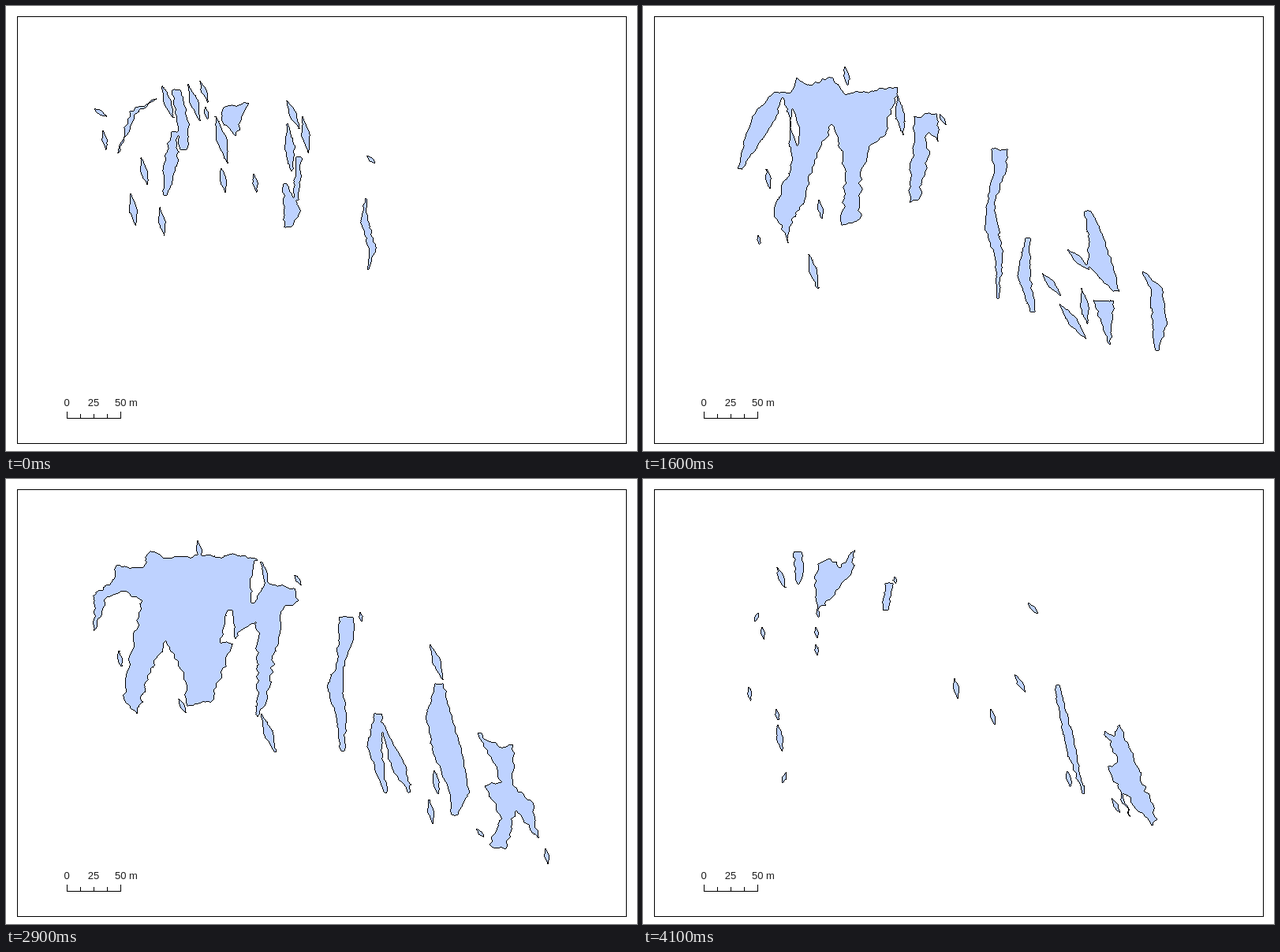
Recreate the animation shown at these times as an HTML page with a canvas. Size 800 by 565 pixels, loop 4.2 s.

```html
<!DOCTYPE html>
<html lang="en">
<head>
<meta charset="utf-8">
<title>Drifting water patches</title>
<style>
  html, body { margin: 0; width: 100%; height: 100%; overflow: hidden; background: #fff; }
  canvas, svg { position: absolute; left: 0; top: 0; display: block; }
  .map { fill: none; stroke: #000; shape-rendering: crispEdges; }
  text { font: 13px "Liberation Sans", Arial, sans-serif; fill: #1c1c1c; }
</style>
</head>
<body>
<canvas width="800" height="565"></canvas>
<svg width="800" height="565">
  <g class="map">
    <rect x="14.5" y="13.5" width="772" height="542"/>
    <path d="M77.5 515V523.5H145.5V515M94.5 518v5m17-5v5m17-5v5"/>
  </g>
  <text x="77" y="508" text-anchor="middle">0</text>
  <text x="111" y="508" text-anchor="middle">25</text>
  <text x="138" y="508">50 m</text>
</svg>
<script>
const W = 800, H = 565, N = W * H;
const STEP = 100, STEPS = 42;
const DRIFT = 1.45; // leftward pixels per step
const REACH = 6;
const FILL = 0xffffd2be, INK = 0xff000000;
const ctx = document.querySelector('canvas').getContext('2d', { willReadFrequently: true });
const poses = [];

let seed = 7;
const rnd = () => (seed = seed * 16807 % 2147483647) / 2147483647;
const pairs = (list, n) => list.flatMap((_, i) => i % n ? [] : [list.slice(i, i + n)]);

// Closed outline whose edges get small random teeth
function outline(pts, amp) {
  ctx.beginPath();
  pts.forEach(([x, y], i) => {
    const [p, q] = pts[(i + 1) % pts.length];
    const len = Math.hypot(p - x, q - y), n = Math.max(1, Math.round(len / 5));
    ctx.lineTo(x, y);
    for (let k = 1; k < n; k++) {
      const off = (rnd() - 0.5) * 2 * amp;
      ctx.lineTo(x + (p - x) * k / n - (q - y) / len * off,
        y + (q - y) * k / n + (p - x) / len * off);
    }
  });
  ctx.closePath();
  ctx.fill();
  if (ctx.globalCompositeOperation === 'source-over') ctx.stroke();
}

// Polygon from x, y pairs
const body = (...list) => outline(pairs(list, 2), 2.6);

// Upright band from x, y, width triples
function band(...list) {
  const nodes = pairs(list, 3);
  const side = s => nodes.map(([x, y, w]) => [x + s * w / 2, y]);
  outline([...side(1), ...side(-1).reverse()], 1.5);
}

// Thin lens between two points
function sliver(x, y, p, q) {
  const len = Math.hypot(p - x, q - y), w = (1 + 0.09 * len) / len;
  const mx = (x + p) / 2, my = (y + q) / 2, dx = (q - y) * w, dy = (x - p) * w;
  outline([[x, y], [mx + dx, my + dy], [p, q], [mx - dx, my - dy]], 0.8);
}

// Small sliver with the usual lean
const speck = (x, y, h) => sliver(x, y, x + h * 0.16, y + h);

function cut(paint) {
  ctx.globalCompositeOperation = 'destination-out';
  paint();
  ctx.globalCompositeOperation = 'source-over';
}

// Distance from every pixel to the nearest one whose mask equals val
function distance(mask, val) {
  const d = new Float32Array(N);
  for (let i = 0; i < N; i++) d[i] = mask[i] === val ? 0 : 99;
  const sweep = (i, s) => {
    d[i] = Math.min(d[i], d[i - s] + 1, d[i - s * W] + 1,
      d[i - s * (W + 1)] + 1.4, d[i - s * (W - 1)] + 1.4);
  };
  for (let i = W + 1; i < N; i++) sweep(i, 1);
  for (let i = N - W - 2; i >= 0; i--) sweep(i, -1);
  return d;
}

// Paints one pose and keeps its signed field, positive inside the water
function pose(at, paint) {
  ctx.clearRect(0, 0, W, H);
  paint();
  const px = ctx.getImageData(0, 0, W, H).data;
  const mask = Uint8Array.from({ length: N }, (_, i) => px[i * 4 + 3] > 100 ? 1 : 0);
  const inner = distance(mask, 0), outer = distance(mask, 1);
  const f = inner.map((d, i) => mask[i]
    ? Math.min(d - 0.5, REACH) : Math.max(0.5 - outer[i], -REACH));
  poses.push({ at, f });
}

pose(0, () => {
  sliver(112, 131, 128, 140);
  speck(123, 158, 24);
  body(142, 187, 151, 160, 157, 134, 191, 118, 162, 138, 154, 163);
  sliver(171, 193, 179, 227);
  speck(158, 238, 41);
  speck(195, 256, 36);
  sliver(198, 102, 212, 142);
  band(216, 107, 10, 225, 150, 15, 225, 182, 8);
  band(213, 160, 7, 209, 200, 17, 202, 240, 4);
  sliver(231, 99, 246, 146);
  sliver(246, 95, 256, 122);
  speck(253, 128, 16);
  sliver(266, 140, 281, 200);
  body(276, 129, 308, 124, 291, 165, 276, 150);
  speck(273, 206, 31);
  speck(314, 213, 24);
  sliver(356, 120, 372, 156);
  sliver(357, 150, 362, 210);
  speck(376, 140, 47);
  band(371, 192, 7, 368, 246, 6);
  band(354, 226, 4, 363, 260, 21, 357, 281, 8);
  sliver(457, 190, 468, 200);
  band(456, 244, 1, 454, 272, 8, 465, 308, 8, 459, 334, 2);
});

pose(9, () => {
  band(148, 120, 3, 151, 147, 19, 134, 188, 8);
  speck(123, 192, 30);
  body(168, 135, 178, 114, 192, 120, 195, 96, 207, 98, 211, 113, 232, 113, 238, 92,
    246, 148, 234, 152, 230, 180, 213, 208, 204, 258, 189, 230, 205, 150, 190, 124);
  body(240, 108, 268, 117, 275, 128, 320, 108, 305, 154, 278, 210, 280, 245, 271, 265,
    261, 235, 258, 160);
  speck(167, 214, 14);
  band(185, 250, 4, 190, 272, 12, 188, 292, 3);
  speck(174, 255, 13);
  sliver(347, 160, 374, 146);
  band(361, 164, 3, 364, 188, 12, 363, 222, 5);
  speck(348, 192, 17);
  sliver(343, 228, 356, 249);
  band(461, 179, 6, 458, 203, 17, 455, 240, 3);
  speck(447, 236, 36);
  band(437, 266, 4, 448, 284, 16, 457, 315, 8, 456, 363, 4);
  speck(571, 266, 37);
  sliver(568, 313, 590, 340);
  sliver(575, 342, 604, 362);
  sliver(655, 360, 654, 400);
});

pose(16, () => {
  band(173, 109, 12, 154, 140, 30, 141, 168, 23, 123, 206, 6);
  body(176, 115, 190, 106, 195, 91, 215, 101, 236, 90, 256, 113, 290, 108, 322, 103,
    306, 165, 287, 177, 275, 215, 275, 270, 252, 278, 256, 235, 254, 185, 239, 150,
    210, 215, 205, 246, 188, 270, 184, 301, 167, 262, 188, 200, 186, 140);
  cut(() => sliver(189, 130, 196, 178));
  speck(256, 77, 24);
  sliver(322, 112, 330, 164);
  body(344, 140, 372, 137, 374, 172, 358, 152, 362, 190, 349, 246, 338, 250, 342, 180);
  sliver(376, 137, 384, 151);
  speck(157, 207, 25);
  speck(146, 291, 11);
  sliver(210, 315, 222, 358);
  speck(223, 246, 24);
  band(452, 182, 20, 453, 208, 15, 441, 250, 8, 442, 280, 17, 451, 320, 9, 450, 371, 3);
  band(488, 295, 6, 483, 343, 16, 494, 388, 6);
  sliver(506, 339, 530, 368);
  sliver(528, 378, 562, 423);
  speck(556, 358, 46);
  band(564, 261, 8, 574, 290, 17, 580, 330, 32, 600, 362, 8);
  sliver(538, 309, 566, 335);
  band(584, 374, 26, 592, 430, 1);
  band(634, 338, 2, 651, 358, 14, 655, 405, 18, 652, 437, 4);
});

// Widest extent, shared by two poses
function flood(shift) {
  ctx.save();
  ctx.translate(shift, 0);
  body(118, 193, 118, 150, 145, 126, 148, 109, 180, 113, 190, 92, 212, 101, 300, 97,
    332, 106, 342, 134, 372, 139, 378, 154, 358, 165, 338, 275, 326, 302, 326, 180,
    300, 195, 267, 283, 237, 288, 232, 245, 210, 204, 190, 246, 173, 297, 157, 280,
    166, 220, 180, 155, 158, 142, 135, 150);
  cut(() => {
    band(325, 104, 6, 326, 132, 18, 320, 157, 4);
    band(291, 167, 6, 288, 208, 18);
  });
  band(438, 176, 18, 438, 205, 18, 430, 240, 8, 424, 262, 20, 432, 300, 13, 434, 345, 4);
  band(479, 298, 8, 474, 340, 18, 488, 397, 4);
  band(483, 310, 4, 505, 365, 18, 518, 397, 4);
  sliver(545, 210, 561, 255);
  band(556, 260, 10, 556, 300, 32, 566, 345, 36, 582, 398, 25, 576, 426, 8);
  body(605, 322, 631, 340, 650, 338, 650, 390, 672, 408, 682, 456, 654, 418, 640, 470,
    620, 464, 636, 430, 614, 390, 637, 385);
  ctx.restore();
}

pose(24, () => {
  flood(0);
  speck(249, 77, 26);
  speck(332, 304, 22);
  speck(203, 328, 32);
  sliver(187, 247, 201, 292);
  speck(227, 278, 20);
  speck(150, 210, 27);
  sliver(508, 163, 518, 178);
  sliver(528, 391, 560, 433);
  sliver(565, 437, 578, 454);
  sliver(596, 421, 622, 465);
  speck(528, 310, 26);
});

pose(29, () => {
  flood(-7);
  speck(243, 78, 26);
  speck(143, 218, 20);
  sliver(219, 279, 228, 297);
  sliver(324, 298, 341, 347);
  sliver(366, 122, 374, 135);
  speck(449, 169, 12);
  speck(543, 370, 30);
  speck(536, 407, 31);
  sliver(596, 444, 606, 455);
  speck(684, 469, 19);
});

pose(36, () => {
  band(180, 111, 14, 178, 150, 27, 166, 185, 21, 158, 230, 6);
  body(193, 97, 215, 95, 221, 120, 213, 141, 202, 142);
  body(222, 106, 245, 110, 272, 91, 284, 102, 270, 142, 245, 165, 239, 245, 226, 240,
    226, 165);
  cut(() => speck(225, 112, 25));
  band(312, 107, 1, 318, 140, 15, 317, 180, 13, 318, 202, 4);
  sliver(334, 128, 328, 146);
  sliver(133, 240, 141, 282);
  speck(140, 295, 16);
  band(180, 296, 3, 187, 345, 13, 187, 398, 6);
  speck(195, 350, 22);
  speck(214, 404, 32);
  speck(236, 356, 27);
  sliver(261, 371, 272, 400);
  sliver(319, 384, 336, 418);
  sliver(401, 171, 420, 210);
  sliver(391, 184, 399, 178);
  sliver(430, 182, 413, 206);
  band(404, 234, 7, 404, 262, 16, 418, 317, 2);
  sliver(486, 157, 511, 185);
  speck(457, 302, 28);
  sliver(449, 338, 459, 377);
  sliver(479, 346, 493, 378);
  band(535, 262, 12, 540, 300, 19, 546, 345, 11, 553, 412, 9);
  sliver(554, 368, 568, 400);
  body(590, 324, 605, 325, 614, 312, 619, 330, 636, 378, 649, 427, 622, 408, 605, 410,
    620, 376);
  sliver(611, 408, 631, 445);
});

pose(41, () => {
  sliver(170, 112, 180, 138);
  band(196, 92, 9, 198, 118, 10, 197, 133, 2);
  body(222, 108, 237, 101, 251, 113, 269, 91, 265, 115, 240, 150, 222, 166, 217, 135);
  band(312, 133, 10, 308, 166, 7);
  speck(319, 124, 9);
  sliver(142, 181, 146, 170);
  speck(151, 188, 16);
  speck(221, 165, 11);
  speck(219, 188, 14);
  speck(219, 210, 14);
  speck(134, 264, 17);
  speck(169, 292, 14);
  speck(171, 312, 34);
  sliver(181, 373, 177, 386);
  speck(395, 253, 26);
  sliver(441, 292, 446, 312);
  sliver(471, 248, 485, 271);
  sliver(488, 157, 501, 171);
  band(526, 262, 4, 530, 286, 9, 542, 340, 11, 558, 399, 2);
  speck(538, 371, 19);
  body(586, 320, 599, 328, 604, 312, 630, 378, 652, 432, 645, 440, 608, 395, 618, 429,
    590, 365, 602, 360);
  sliver(594, 405, 605, 424);
});

// Smooth noise for ragged shorelines, 0 to 1
function makeNoise() {
  const cw = 3, ch = 5, cols = Math.ceil(W / cw) + 2;
  const grid = Array.from({ length: cols * (Math.ceil(H / ch) + 2) }, rnd);
  return Float32Array.from({ length: N }, (_, i) => {
    const x = i % W / cw, y = Math.floor(i / W) / ch;
    const g = Math.floor(y) * cols + Math.floor(x), u = x % 1, v = y % 1;
    const top = grid[g] + (grid[g + 1] - grid[g]) * u;
    const low = grid[g + cols] + (grid[g + cols + 1] - grid[g + cols]) * u;
    return top + (low - top) * v;
  });
}

const noise = makeNoise();
const image = ctx.createImageData(W, H);
const pixels = new Uint32Array(image.data.buffer);
const wet = new Uint8Array(N);

function draw(step) {
  const k = Math.max(1, poses.findIndex(p => p.at >= step));
  const a = poses[k - 1], b = poses[k];
  const t = (step - a.at) / (b.at - a.at);
  const da = Math.round(DRIFT * (step - a.at)), db = Math.round(DRIFT * (step - b.at));
  const mid = Math.sin(Math.PI * t);
  const low = -0.5 - 0.8 * mid, span = 1.2 + 2.5 * mid;
  const shift = step * 7919;
  wet.fill(0);
  for (let y = 30; y < 535; y++) {
    for (let x = 30; x < 770; x++) {
      const i = y * W + x;
      const v = a.f[i + da] * (1 - t) + b.f[i + db] * t;
      if (v > -4) wet[i] = v + low + span * noise[(i + shift) % N] > 0 ? 1 : 0;
    }
  }
  pixels.fill(0);
  for (let i = W; i < N - W; i++) {
    if (wet[i]) pixels[i] = wet[i - 1] && wet[i + 1] && wet[i - W] && wet[i + W] ? FILL : INK;
  }
  ctx.putImageData(image, 0, 0);
}

let shown = -1;
function tick() {
  const step = Math.floor(performance.now() / STEP) % STEPS;
  if (step !== shown) draw(shown = step);
  requestAnimationFrame(tick);
}
tick();
</script>
</body>
</html>
```
